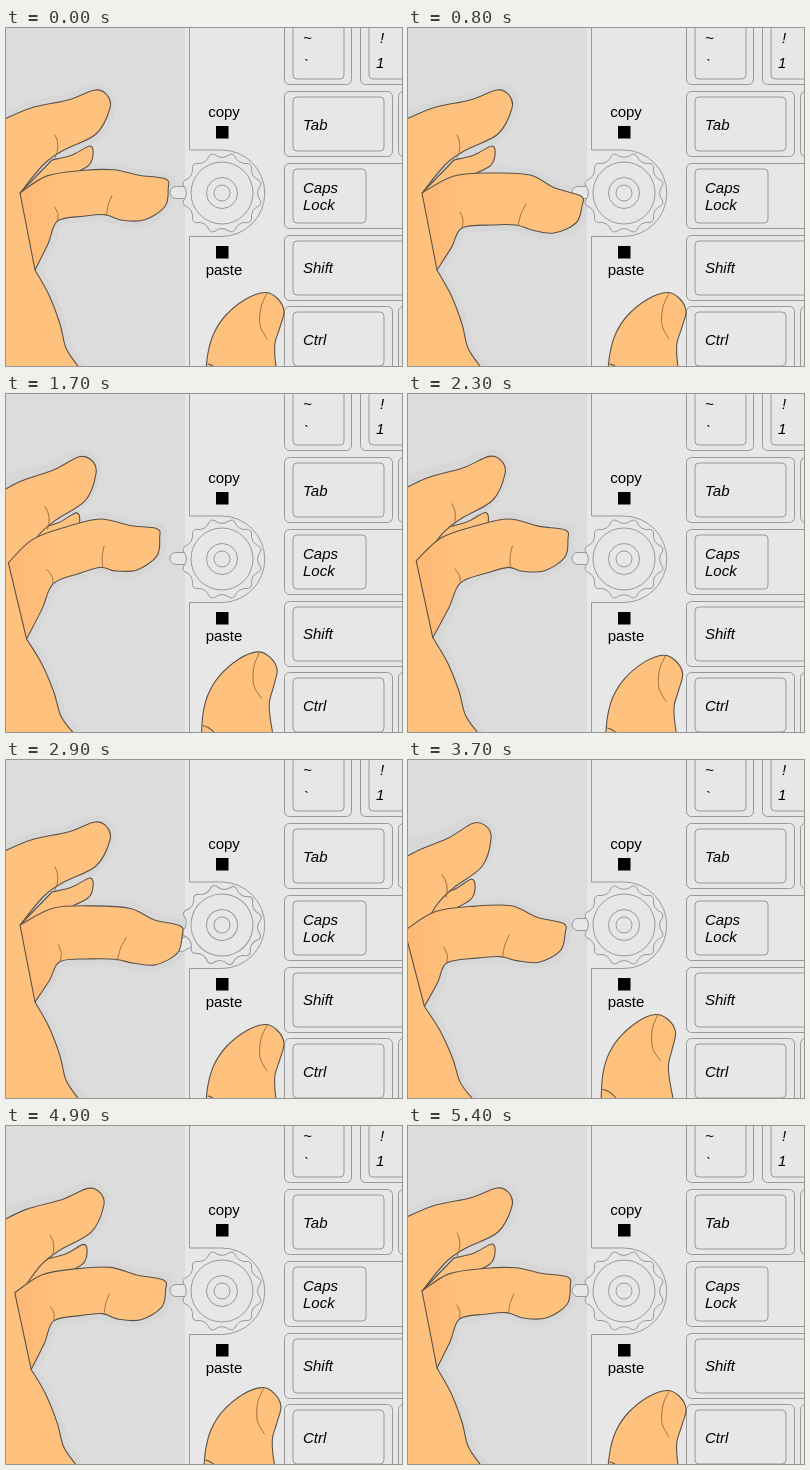
Recreate the animation shown at these times as an HTML page. Size 396x338 px, loop 5.5 s.

```html
<!DOCTYPE html>
<html lang="en">
<head>
<meta charset="utf-8">
<title>Copy and paste dial</title>
<style>
html, body { margin: 0; width: 100%; height: 100%; overflow: hidden; background: #e7e7e7; }
svg { display: block; width: 396px; height: 338px; }
text { font: 15px "Liberation Sans", Arial, sans-serif; fill: #000; }
#keys text { font-style: italic; }
.line { fill: none; stroke: #999; }
.cap { fill: #e7e7e7; stroke: #999; }
.fill { fill: #ffc27e; }
.edge { fill: none; stroke: #5a5148; stroke-width: 1.1; stroke-linecap: round; stroke-linejoin: round; }
.skin { fill: #ffc27e; stroke: #5a5148; stroke-width: 1.1; stroke-linejoin: round; }
.fold { fill: none; stroke: #9a6a3c; stroke-width: .9; stroke-linecap: round; }
#shade { fill: none; stroke: #000; stroke-opacity: .025; stroke-width: 13; stroke-linejoin: round; }
#index { fill: url(#blush); }
</style>
</head>
<body>
<svg viewBox="0 0 396 338">
  <defs>
    <clipPath id="desk"><rect width="179" height="338"/></clipPath>
    <linearGradient id="blush" gradientUnits="userSpaceOnUse" x1="15" y1="0" x2="65" y2="0">
      <stop offset="0" stop-color="#ffb775"/><stop offset="1" stop-color="#ffc27e"/>
    </linearGradient>
  </defs>
  <rect width="396" height="338" fill="#e7e7e7"/>
  <rect width="179" height="338" fill="#dcdcdc"/>
  <g clip-path="url(#desk)"><path id="shade"/></g>
  <path class="line" d="M183.5 0V122H215.5A43 43 0 0 1 215.5 208.5H183.5V338"/>
  <g id="keys"></g>
  <text x="218" y="89" text-anchor="middle">copy</text>
  <text x="218" y="246.5" text-anchor="middle">paste</text>
  <rect x="210" y="98" width="12.5" height="12.5"/>
  <rect x="210" y="218" width="12.5" height="12.5"/>
  <g id="dial">
    <path class="cap" d="M186 158.5H170A6 6 0 0 0 170 170.5H186"/>
    <path id="gear" class="cap"/>
    <circle class="line" cx="216" cy="165" r="31"/>
    <circle class="line" cx="216" cy="165" r="15.5"/>
    <circle class="line" cx="216" cy="165" r="8"/>
  </g>
  <g id="hand">
    <path id="ring" class="skin"/>
    <path id="palm" class="fill"/>
    <g id="middle">
      <path id="middleFill" class="fill"/>
      <path id="middleEdge" class="edge"/>
      <path class="fold" d="M49 107Q55 117 49 130"/>
    </g>
    <path id="index" class="skin"/>
    <path id="palmEdge" class="edge"/>
    <path id="jointFold" class="fold"/>
    <path id="baseFold" class="fold"/>
    <path id="thumb" class="skin"/>
    <path id="nail" class="fold"/>
    <path class="edge" d="M202 336Q208 337 215 346"/>
  </g>
</svg>
<script>
const LOOP = 5500, STEP = 100;
const $ = id => document.getElementById(id);
const set = (id, d) => $(id).setAttribute('d', d);
const turn = (id, value) => $(id).setAttribute('transform', value);
const pts = s => s.split(' ').map(p => p.split(',').map(Number));
const mix = (a, b, u) => a + (b - a) * u;

// Smooth open curve through the points
function curve(p) {
  let d = 'M' + p[0];
  for (let i = 0; i < p.length - 1; i++) {
    const a = p[i - 1] || p[i], b = p[i], c = p[i + 1], e = p[i + 2] || c;
    d += `C${b[0] + (c[0] - a[0]) / 6} ${b[1] + (c[1] - a[1]) / 6} ` +
         `${c[0] - (e[0] - b[0]) / 6} ${c[1] - (e[1] - b[1]) / 6} ${c[0]} ${c[1]}`;
  }
  return d;
}

// Still outlines of the hand
const knuckle = [14, 165], heel = [29, 242], tip = [90, 62], joint = [115, 173];
const middle = curve(pts('-10,95 25,80 62,72 89,62 101,67 104,80 90,106 58,122 38,136 14,165'));
const palm = curve(pts('29,242 43,267 54,296 60,320 72,338 86,354'));
const thumb = curve(pts('199,352 202,325 208,305 220,287 240,271 259,264.5 271,270 278,283 274,299 269,315 269,330 272,354'));

// Index finger: near bone, far bone, near bone, from knuckle to palm
const upper = pts('46,148 86,145 122,147');
const end = pts('147,160 173,168 174,178 168,195 146,205 124,202');
const lower = pts('108,197 84,197 54,200');

// Pose: near bone angle, near bone scale, far bone angle
const rest = [-4.5, .88, -9], down = [0, 1, 0], up = [-13.6, .93, -8];
const press = [1, 1.02, -4], lift = [-4, .94, 0];
const poses = [[0, rest], [600, [3, 1.03, 2]], [800, down], [1200, up], [2500, up],
  [2900, press], [3000, [2, 1.02, -2]], [3600, [0, 1.04, 0]], [3700, down], [4200, lift], [5400, rest]];
const retreat = [[0, 0], [1300, 0], [1900, 1], [2500, 0], [3000, 0], [3600, 1], [4200, 1], [5200, 0]];
const lever = [[0, 0], [800, 0], [1200, 25], [1300, 25], [1500, 0], [2500, 0], [3000, -34], [3200, 0]];

function at(keys, t) {
  const i = keys.findLastIndex(k => k[0] <= t);
  const [t0, a] = keys[i], [t1, b] = keys[i + 1] || [LOOP, a];
  const u = (t - t0) / (t1 - t0);
  return Array.isArray(a) ? a.map((v, j) => mix(v, b[j], u)) : mix(a, b, u);
}

function spin([x, y], [cx, cy], deg, scale = 1, [tx, ty] = [cx, cy]) {
  const a = deg * Math.PI / 180, c = Math.cos(a) * scale, s = Math.sin(a) * scale;
  return [tx + (x - cx) * c - (y - cy) * s, ty + (x - cx) * s + (y - cy) * c];
}

function drawKeys() {
  const box = (x, y, w, h, r) =>
    `<rect class="line" x="${x + .5}" y="${y + .5}" width="${w}" height="${h}" rx="${r}"/>`;
  const key = (x, y, w, face = w - 17) => box(x, y, w, 65, 5) + box(x + 8.5, y + 5.5, face, 54, 4);
  const label = (x, y, s) => `<text x="${x}" y="${y}">${s}</text>`;
  $('keys').innerHTML =
    key(278, -9, 67, 51) + key(354, -9, 90) +
    key(278, 63, 108) + key(392, 63, 90) +
    key(278, 135, 140, 73) + key(278, 207, 140) +
    key(278, 278, 108) + key(392, 278, 90) +
    label(297, 15, '~') + label(298, 42, '`') + label(374, 15, '!') + label(370, 40, '1') +
    label(297, 102, 'Tab') + label(297, 165, 'Caps') + label(297, 182, 'Lock') +
    label(297, 245, 'Shift') + label(297, 317, 'Ctrl');
}

// Narrow teeth joined by hollows
function drawGear() {
  const n = 12, gap = 2 * Math.PI / n, half = .06;
  const spot = (a, r) => `${216 + r * Math.cos(a)} ${165 + r * Math.sin(a)} `;
  let d = '';
  for (let i = 0; i < n; i++) {
    const a = (i + .5) * gap;
    d += (i ? 'L' : 'M') + spot(a - half, 39.5) + 'Q' + spot(a, 41) + spot(a + half, 39.5) +
      'Q' + spot(a + gap / 2, 32.5) + spot(a + gap - half, 39.5);
  }
  set('gear', d + 'Z');
}

function drawHand() {
  set('ring', curve(pts('46,132 66,127 84,118 87,127 82,138 62,148')) + `L${knuckle}Z`);
  set('palm', palm + `L-20 354L-20 92L${knuckle}Z`);
  set('palmEdge', palm);
  set('middleFill', middle + 'L-20 170Z');
  set('middleEdge', middle);
  set('thumb', thumb);
  set('nail', curve(pts('261,265.5 255,279 254,297 261,311')));
}

function draw(t) {
  const [a, s, b] = at(poses, t);
  const near = p => spin(p, knuckle, a, s);
  const far = p => spin(p, joint, b, 1, near(joint));
  const root = near(lower[2]);
  const side = [mix(root[0], heel[0], .45) + 1, mix(root[1], heel[1], .45)];
  const index = curve([knuckle, ...upper.map(near), ...end.map(far), ...lower.map(near), side, heel]);
  set('index', index + 'Z');
  set('jointFold', curve(pts('110,198 113,186 118,176').map(near)));
  set('baseFold', curve(pts('52,184 55,192 54,200').map(near)));
  set('shade', middle + index + palm);

  // The hand swings back as one piece
  const back = at(retreat, t);
  const swing = `translate(${-24 * back} ${back}) rotate(${-3.6 * back} ${tip})`;
  turn('hand', swing);
  turn('shade', swing);
  turn('middle', `rotate(${-7 * back} ${tip})`);
  turn('dial', `rotate(${at(lever, t)} 216 165)`);
}

drawKeys();
drawGear();
drawHand();
const start = performance.now();
function tick() {
  const t = (performance.now() - start) % LOOP;
  draw(Math.floor(t / STEP) * STEP);
  requestAnimationFrame(tick);
}
tick();
</script>
</body>
</html>
```
